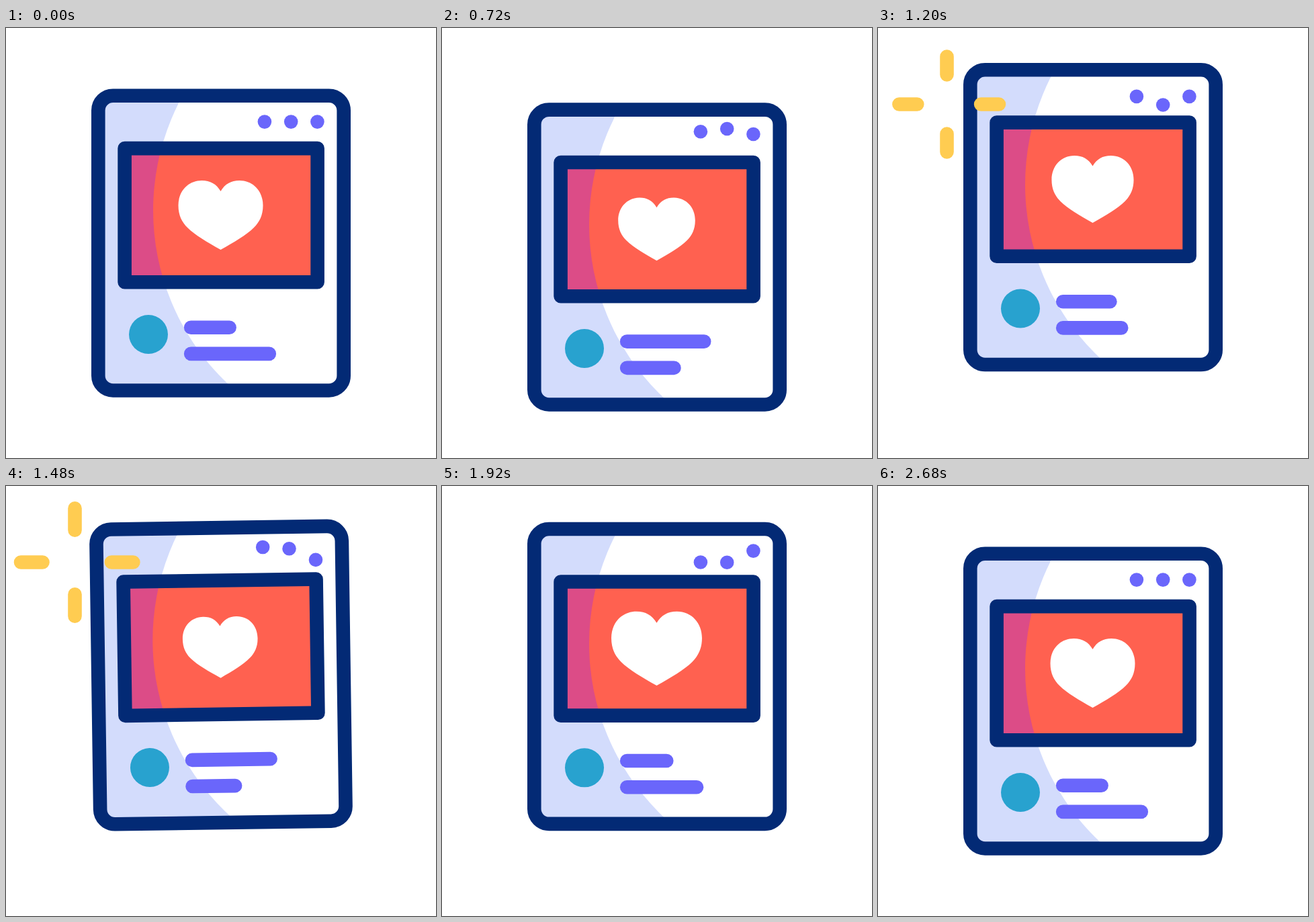
An HTML page for the animation above (3 s loop, 640 px wide and 640 px high).

```html
<!DOCTYPE html>
<html lang="en">
<head>
<meta charset="utf-8">
<title>Liked post</title>
<style>
  html, body { margin: 0; width: 100%; height: 100%; overflow: hidden; background: #fff; }
  svg { display: block; width: 100vw; height: 100vh; }
  .line { fill: none; stroke-width: 20.6; stroke-linecap: round; stroke-linejoin: round; }
  .navy { stroke: #032a75; }
  .violet { stroke: #6a66fb; }
  .yellow { stroke: #ffcc51; }
</style>
</head>
<body>
<svg viewBox="0 0 640 640">
  <defs>
    <clipPath id="cardClip"><rect x="137" y="100.5" width="366" height="439" rx="22"/></clipPath>
    <clipPath id="photoClip"><rect x="176.5" y="179" width="287" height="199"/></clipPath>
  </defs>
  <g id="card">
    <g clip-path="url(#cardClip)">
      <rect x="130" y="95" width="380" height="450" fill="#d3dcfc"/>
      <circle cx="574" cy="271.5" r="355" fill="#fff"/>
    </g>
    <rect class="line navy" x="137.3" y="100.7" width="365.4" height="438.8" rx="22"/>
    <g clip-path="url(#photoClip)">
      <rect x="170" y="170" width="300" height="215" fill="#dc4c87"/>
      <circle cx="574" cy="271.5" r="355" fill="#ff6150"/>
    </g>
    <rect class="line navy" x="176.6" y="179.1" width="287" height="199.2"/>
    <path id="heart" fill="#fff" d="M319.5 243C313 232 304 227 291.5 227C271 227 256.5 243 256.5 264
      C256.5 279 262 289 270 297C281 308 300 319 319.5 330C339 319 358 308 369 297
      C377 289 382.5 279 382.5 264C382.5 243 368 227 347.5 227C335 227 326 232 319.5 243Z"/>
    <g id="dots" fill="#6a66fb">
      <circle cx="384.9" cy="139.6" r="10.3"/>
      <circle cx="424.2" cy="139.6" r="10.3"/>
      <circle cx="463.4" cy="139.6" r="10.3"/>
    </g>
    <circle cx="212" cy="456" r="29" fill="#28a2cf"/>
    <path id="bar1" class="line violet"/>
    <path id="bar2" class="line violet"/>
  </g>
  <path id="spark" class="line yellow"/>
</svg>
<script>
  const LOOP = 3000, STEP = 40, LEG = 400;
  const $ = id => document.getElementById(id);
  const dots = [...$('dots').children];

  // Eased interpolation through [time, value] keys.
  function track(t, keys) {
    if (t <= keys[0][0]) return keys[0][1];
    for (let i = 1; i < keys.length; i++) {
      const [t0, a] = keys[i - 1], [t1, b] = keys[i];
      if (t < t1) {
        const x = (t - t0) / (t1 - t0);
        return a + (b - a) * x * x * (3 - 2 * x);
      }
    }
    return keys[keys.length - 1][1];
  }
  const steps = (start, leg, values) => values.map((v, i) => [start + i * leg, v]);

  const lift = [[200, 0], [504, 25.3], [636, 25.3], [1162, -38.5], [1830, -38.5], [2505, 0]];
  const tilt = steps(1230, 172, [0, -5.9, 5.9, -5.9, 0]);
  const beat = [...steps(200, LEG, [1, 0.864, 1.074, 0.864, 1.076]), [2560, 1]];
  const hop = steps(200, LEG, [0, -11.8, 13.4, -11.8, 13.4, 0]);
  const swap = steps(200, LEG, [0, 1, 0, 1, 0, 1, 0]);
  const sparkTip = [[960, 44], [1320, 80.3]];
  const sparkTail = [[1400, 44], [1800, 80.3]];

  function sparkPath(t) {
    const tip = track(t, sparkTip), tail = track(t, sparkTail);
    if (tip - tail < 0.1) return '';
    return [-1, 1].map(s =>
      `M102.5 ${113.5 + s * tail}V${113.5 + s * tip}` +
      `M${105.7 + s * (tail + 3.4)} 113.5H${105.7 + s * (tip + 3.4)}`).join('');
  }

  function draw(now) {
    const t = Math.floor(now % LOOP / STEP) * STEP;
    $('card').setAttribute('transform',
      `translate(0 ${track(t, lift)}) rotate(${track(t, tilt)} 320 320)`);
    $('heart').setAttribute('transform',
      `translate(319.5 278.5) scale(${track(t, beat)}) translate(-319.5 -278.5)`);
    dots.forEach((dot, i) => dot.setAttribute('cy', 139.6 + track(t - 200 * i, hop)));
    $('bar1').setAttribute('d', `M275.2 445.7H${332.6 + 59.2 * track(t - 80, swap)}`);
    $('bar2').setAttribute('d', `M275.2 484.9H${391.8 - 59.2 * track(t, swap)}`);
    $('spark').setAttribute('d', sparkPath(t));
  }

  const begin = performance.now();
  function tick() {
    draw(performance.now() - begin);
    requestAnimationFrame(tick);
  }
  tick();
</script>
</body>
</html>
```
